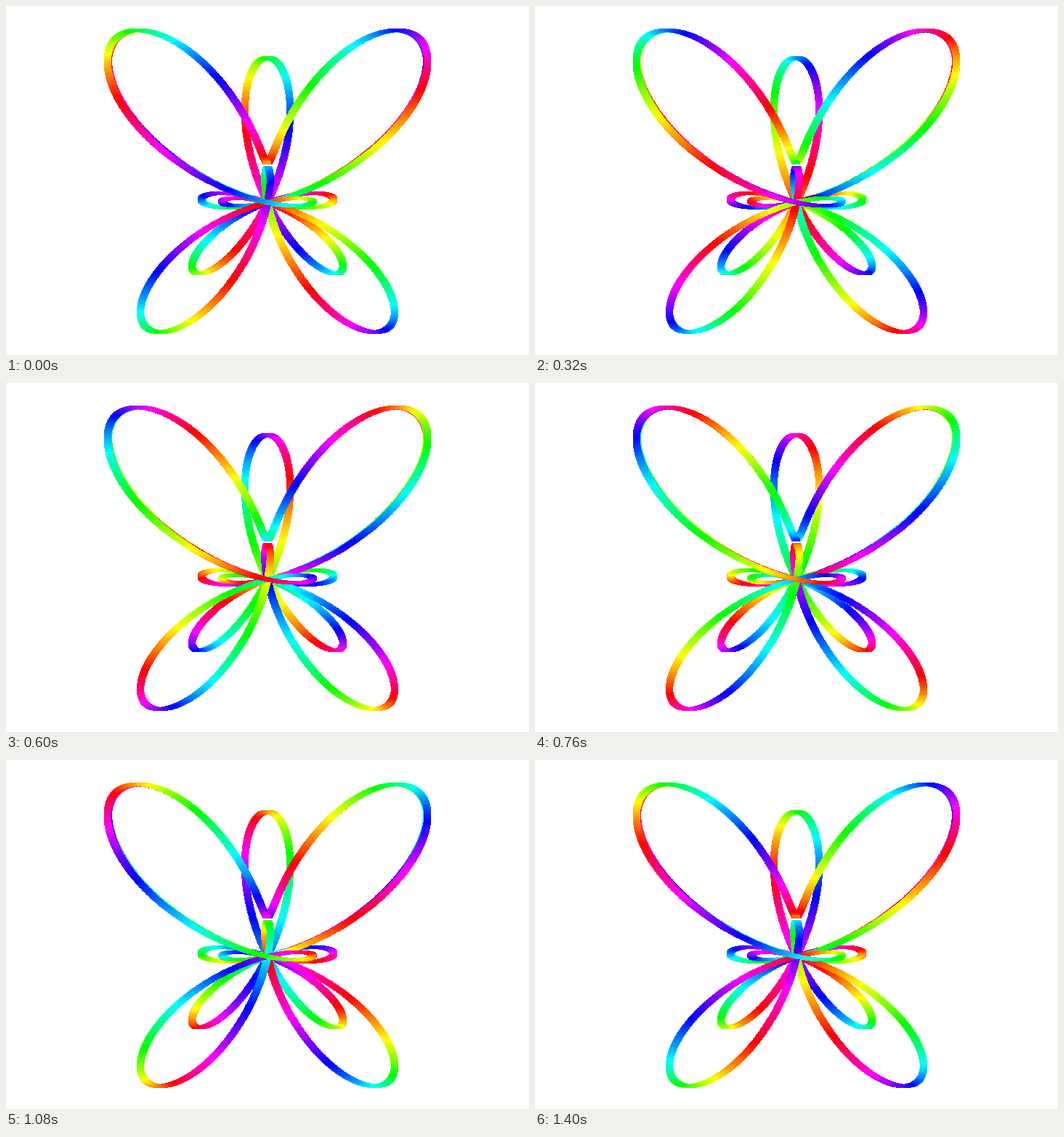
An HTML page with a canvas that plays this animation: 720 px wide and 480 px high, repeating every 1440 ms.

```html
<!DOCTYPE html>
<html lang="en">
<head>
<meta charset="utf-8">
<title>Rainbow butterfly curve</title>
<style>
  html, body { margin: 0; width: 100%; height: 100%; overflow: hidden; background: #fff; }
  canvas { display: block; }
</style>
</head>
<body>
<canvas id="stage" width="720" height="480"></canvas>
<script>
const ctx = document.getElementById('stage').getContext('2d');

const LOOP = 1440, STEP = 40;
const POINTS = 7200, SCALE = 75.6;
const CENTER = { x: 360, y: 270.2 };
const NIB = { w: 10, h: 5 };
const HUE_START = 266.6, HUE_CYCLES = 14.36;

// Polar butterfly: r = e^cos(t) - 2cos(4t) - sin^5(t/2), two turns.
function dab(i) {
  const u = i / POINTS;
  const t = u * 4 * Math.PI;
  const r = SCALE * (Math.exp(Math.cos(t)) - 2 * Math.cos(4 * t) - Math.sin(t / 2) ** 5);
  return {
    x: Math.round(CENTER.x + r * Math.sin(t) - NIB.w / 2),
    y: Math.round(CENTER.y - r * Math.cos(t) - NIB.h / 2),
    hue: HUE_START + 360 * HUE_CYCLES * u
  };
}

const dabs = Array.from({ length: POINTS + 1 }, (_, i) => dab(i));
const colors = Array.from({ length: 360 }, (_, h) => `hsl(${h}, 100%, 50%)`);

function draw(step) {
  const shift = step * STEP / LOOP * 360;
  ctx.fillStyle = '#fff';
  ctx.fillRect(0, 0, 720, 480);
  for (const d of dabs) {
    ctx.fillStyle = colors[Math.floor(d.hue + shift) % 360];
    ctx.fillRect(d.x, d.y, NIB.w, NIB.h);
  }
}

const start = performance.now();
let shown = -1;

function tick() {
  const time = Math.max(0, performance.now() - start) % LOOP;
  const step = Math.floor(time / STEP);
  if (step !== shown) draw(shown = step);
  requestAnimationFrame(tick);
}
tick();
</script>
</body>
</html>
```
